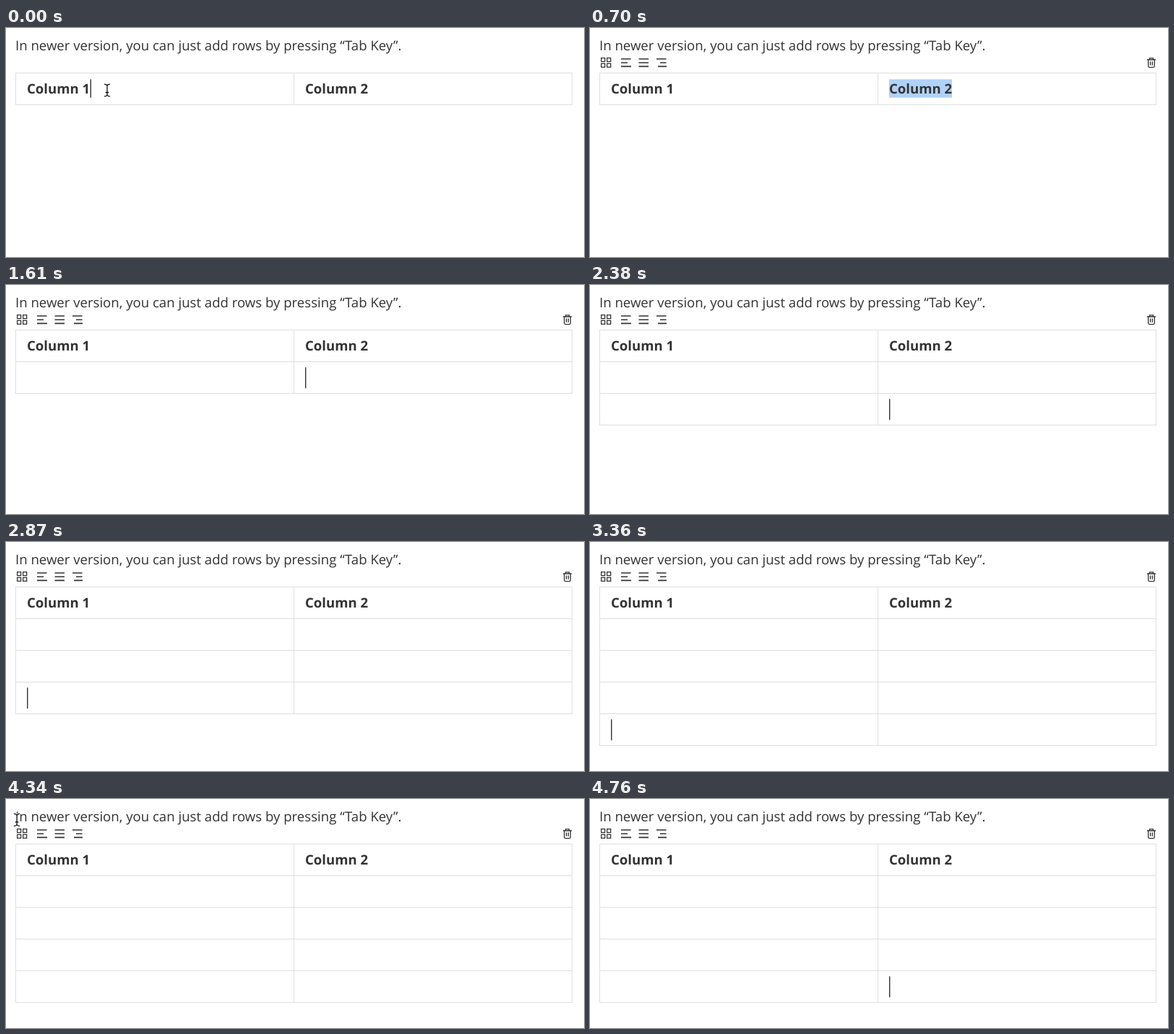
Animation, 800 px wide and 318 px high, one loop 4.97 s. Source, as an HTML page:

```html
<!DOCTYPE html>
<html lang="en">
<head>
<meta charset="utf-8">
<title>Add rows with Tab</title>
<style>
  html, body { margin: 0; width: 100%; height: 100%; overflow: hidden; background: #fff; }
  svg { display: block; }
  text { font: 18.6px "Open Sans", sans-serif; fill: #333; text-rendering: geometricPrecision; }
  .head { font-weight: 700; }
  .grid { fill: none; stroke: #dfdfdf; shape-rendering: crispEdges; }
  .icons { fill: none; stroke: #333; stroke-width: 1.6; }
  .icons .thin { stroke-width: 1.3; }
  #mark { fill: #b0d2f8; }
  #caret { fill: #333; }
  #pointer { fill: none; stroke-linecap: round; }
</style>
</head>
<body>
<svg width="800" height="318" viewBox="0 0 800 318">
  <defs>
    <path id="beam" d="M-3.6 -8.4q3 0 3.6 2q.6 -2 3.6 -2 M0 -6.4v12.8 M-3.6 8.4q3 0 3.6 -2q.6 2 3.6 2 M-1.8 3h3.6"/>
  </defs>

  <text x="13" y="31.4">In newer version, you can just add rows by pressing “Tab Key”.</text>

  <g id="tools" class="icons">
    <path class="thin" d="M15.6 41.6h5v5h-5z M23.6 41.6h5v5h-5z M15.6 49.4h5v5h-5z M23.6 49.4h5v5h-5z"/>
    <path d="M43 43h13.5 M43 48.2h9 M43 53.4h14"/>
    <path d="M67.5 43h13.5 M67.5 48.2h13.5 M67.5 53.4h13.5"/>
    <path d="M92 43h13.5 M97 48.2h8.5 M94 53.4h12"/>
    <path class="thin" d="M771 44h12 M774.5 43.8v-2h5v2 M772.7 44v8.8q0 1.8 1.8 1.8h5q1.8 0 1.8 -1.8v-8.8 M775.6 46.4v5.4 M778.4 46.4v5.4"/>
  </g>

  <path id="grid" class="grid"/>
  <rect id="mark" x="414" y="71.3" width="87" height="25.4"/>
  <text class="head" x="29" y="91.2">Column 1</text>
  <text class="head" x="414" y="91.2">Column 2</text>
  <rect id="caret" width="1.4"/>

  <g id="pointer">
    <use href="#beam" stroke="#fff" stroke-width="3"/>
    <use href="#beam" stroke="#111" stroke-width="1.3"/>
  </g>
</svg>
<script>
  const TICK = 70, TICKS = 71, ROW = 44, TOP = 106;
  const [tools, grid, mark, caret, pointer] =
    ["tools", "grid", "mark", "caret", "pointer"].map(id => document.getElementById(id));

  const rowTicks = [18, 28, 37, 48];
  // tick, row, column
  const tabs = [[18, 1, 0], [22, 1, 1], [28, 2, 0], [34, 2, 1],
                [37, 3, 0], [43, 3, 1], [48, 4, 0], [52, 4, 1]];
  // tick, x, y
  const path = [[57, 140, 86.5], [62, 15, 29], [64, 43, 25], [65, 60, 8], [66, 75, -14]];

  const clamp = v => Math.max(0, Math.min(1, v));
  const fadeOut = (n, from) => clamp(1 - (n - from + 1) / 4);
  const fadeIn = (n, from) => clamp((n - from + 1) / 4);
  const show = (el, opacity) => el.setAttribute("opacity", opacity);

  function drawGrid(rows) {
    const bottom = TOP + rows * ROW + .5;
    let d = "M13 62.5H784";
    for (let r = 0; r <= rows; r++) d += `M13 ${TOP + r * ROW + .5}H784`;
    for (const x of [13.5, 398.5, 783.5]) d += `M${x} 62V${bottom}`;
    grid.setAttribute("d", d);
  }

  function drawCaret(n) {
    const cell = tabs.filter(s => s[0] <= n).pop();
    const [x, y, h] = cell
      ? [cell[2] ? 414 : 29, 114.3 + (cell[1] - 1) * ROW, 29]
      : [116.6, 71.3, 25.4];
    caret.setAttribute("x", x);
    caret.setAttribute("y", y);
    caret.setAttribute("height", h);
    show(caret, cell ? Math.max(fadeOut(n, 59), fadeIn(n, 65)) : fadeOut(n, 5));
  }

  function drawPointer(n) {
    let [, x, y] = path[0];
    if (n > path[0][0]) {
      const i = Math.max(1, path.findIndex(p => p[0] >= n));
      const [a, b] = [path[i - 1], path[i]];
      const k = clamp((n - a[0]) / (b[0] - a[0]));
      x = a[1] + (b[1] - a[1]) * k;
      y = a[2] + (b[2] - a[2]) * k;
    }
    pointer.setAttribute("transform", `translate(${x} ${y})`);
    show(pointer, n < 10 || (n >= 57 && n < 66) ? 1 : 0);
  }

  const start = performance.now();
  function frame() {
    const n = Math.floor((performance.now() - start) / TICK) % TICKS;
    show(tools, clamp(n / 2));
    show(mark, n >= 10 && n < 18 ? 1 : 0);
    drawGrid(rowTicks.filter(t => t <= n).length);
    drawCaret(n);
    drawPointer(n);
    requestAnimationFrame(frame);
  }
  frame();
</script>
</body>
</html>
```
